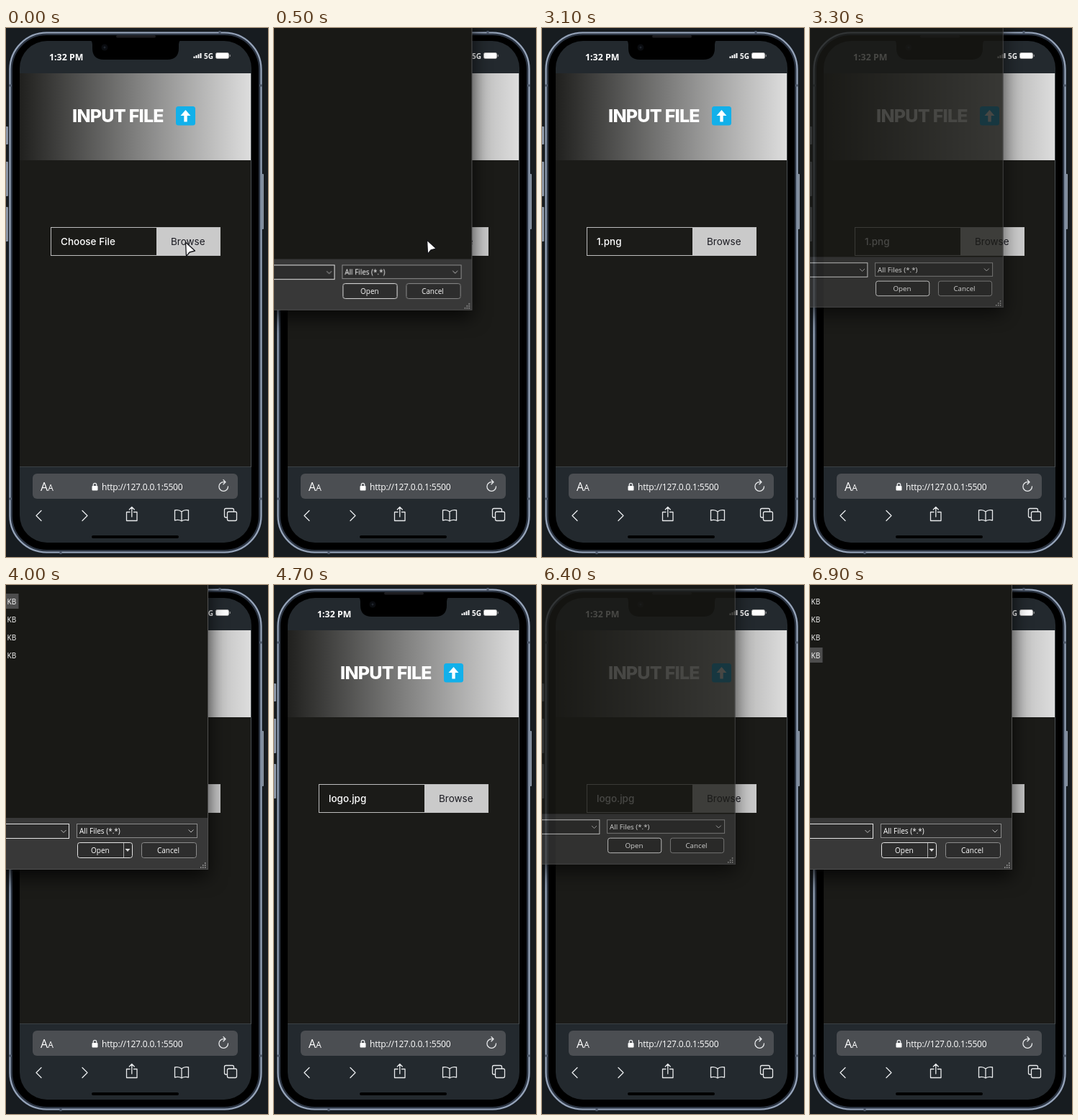
An HTML page that plays this animation: 364x736 px, repeating every 8000 ms.

```html
<!DOCTYPE html>
<html lang="en">
<head>
<meta charset="utf-8">
<title>Input file</title>
<style>
  html, body { margin: 0; width: 100%; height: 100%; overflow: hidden; background: #171c20; }
  svg { display: block; width: 364px; height: 736px; }
  text { font-family: "Open Sans", "Noto Sans", sans-serif; fill: #fff; }
  .page text { font: 500 13.5px Inter, sans-serif; }
  .page .title { font: 800 25px Inter, sans-serif; letter-spacing: -.75px; }
  .page .browse { font-weight: 400; fill: #1b1b22; }
  .status { font-weight: 700; font-size: 12.4px; }
  .line { fill: none; stroke: #e8eaec; stroke-width: 1.3; stroke-linecap: round; stroke-linejoin: round; }
  .dialog text { font-size: 10px; }
  .box { fill: #2d2d2d; stroke: #8c8c8c; }
  .lit { stroke: #e4e4e4; }
  .thin { fill: none; stroke: #bbb; }
  .panel { filter: drop-shadow(0 10px 13px rgba(0, 0, 0, .75)); }

  .dialog, .files, .pick, .cursor, .name {
    animation: 8s step-end -5ms infinite;
  }
  .dialog { transform-origin: -230px 95px; animation-name: dialog; }
  .files { animation-name: files; }
  .pick { animation-name: pick; }
  .cursor { animation-name: cursor; }
  .n1 { animation-name: n1; }
  .n2 { animation-name: n2; }
  .n3 { animation-name: n3; }

  @keyframes dialog {
    0%, 22.5%, 58.75% { opacity: 0; transform: scale(.94); }
    3.75%, 40%, 78.75% { opacity: .3; transform: scale(.955); }
    5%, 41.25%, 80% { opacity: .8; transform: scale(.976); }
    6.25%, 42.5%, 81.25% { opacity: 1; transform: scale(.989); }
    7.5%, 43.75%, 82.5% { opacity: 1; transform: scale(.997); }
    8.75%, 45%, 83.75%, 100% { opacity: 1; transform: none; }
    20%, 56.25% { opacity: .52; transform: scale(.975); }
    21.25%, 57.5% { opacity: .12; transform: scale(.96); }
  }
  @keyframes files {
    0%, 22.5%, 58.75% { visibility: hidden; }
    8.75%, 43.75%, 82.5%, 100% { visibility: visible; }
  }
  @keyframes pick {
    0%, 22.5%, 58.75% { opacity: 0; transform: none; stroke: none; }
    17.5% { opacity: 1; transform: translateY(25px); stroke: #8a8a8a; }
    50% { opacity: 1; transform: none; stroke: none; }
    86.25%, 100% { opacity: 1; transform: translateY(75px); stroke: none; }
  }
  @keyframes cursor {
    0% { transform: translate(249px, 298px); }
    2.5% { transform: translate(249px, 298px); animation-timing-function: steps(3); }
    6.25% { transform: translate(212px, 295px); animation-timing-function: steps(4); }
    11.25% { transform: translate(-24px, 170px); }
    22.5% { transform: translate(-24px, 150px); animation-timing-function: steps(6); }
    30%, 33.75% { transform: translate(255px, 299px); }
    35% { transform: translate(255px, 299px); animation-timing-function: steps(3); }
    38.75% { transform: translate(-24px, 160px); }
    58.75% { transform: translate(-24px, 130px); animation-timing-function: steps(6); }
    66.25% { transform: translate(261px, 295px); animation-timing-function: steps(2); }
    68.75% { transform: translate(265px, 298px); }
    71.25% { transform: translate(265px, 298px); animation-timing-function: steps(4); }
    76.25%, 100% { transform: translate(-24px, 190px); }
  }
  @keyframes n1 { 0% { opacity: 1; } 21.25%, 100% { opacity: 0; } }
  @keyframes n2 { 0%, 57.5%, 100% { opacity: 0; } 21.25% { opacity: 1; } }
  @keyframes n3 { 0% { opacity: 0; } 57.5%, 100% { opacity: 1; } }
</style>
</head>
<body>
<svg viewBox="0 0 364 736">
  <defs>
    <linearGradient id="banner">
      <stop offset="0" stop-color="#20201e"/>
      <stop offset="1" stop-color="#dedede"/>
    </linearGradient>
    <clipPath id="screen"><rect x="19" y="18" width="322" height="698" rx="38"/></clipPath>
  </defs>

  <!-- phone body -->
  <g fill="#8a95a5">
    <rect x="-2" y="137" width="5" height="25" rx="1"/>
    <rect x="-2" y="186" width="5" height="48" rx="1"/>
    <rect x="-2" y="249" width="5" height="48" rx="1"/>
    <rect x="355" y="203" width="3" height="77" rx="1"/>
  </g>
  <rect x="6.5" y="7.5" width="347" height="721" rx="50" stroke="#2c3543" stroke-width="5"/>
  <rect x="5.5" y="6.5" width="349" height="723" rx="51" fill="none" stroke="#97a5ba" stroke-width="2.2"/>
  <path d="M4 80h4M352 80h4M4 655h4M352 655h4M76 728v4M297 4v4" stroke="#4e596a" stroke-width="3"/>

  <g class="page" clip-path="url(#screen)">
    <rect x="19" y="18" width="322" height="698" fill="#23292e"/>
    <rect x="19" y="63" width="322" height="548" fill="#1b1b18"/>
    <rect x="19" y="63" width="322" height="121" fill="url(#banner)"/>
    <path d="M19 610.5h322" stroke="#3b4044"/>
    <path d="M340.5 63v548" stroke="#4a4f52"/>
    <text class="title" x="92" y="131">INPUT FILE</text>
    <rect x="236" y="109" width="27" height="26.5" rx="3.5" fill="#12b0ea"/>
    <path d="M249.5 114l7 8h-4.800v8.500h-4.400V122h-4.800z" fill="#fff"/>
    <rect x="62.5" y="277.5" width="235" height="39" fill="none" stroke="#bdbdbd"/>
    <rect x="209" y="278" width="88.500" height="38.500" fill="#cacaca"/>
    <text class="browse" x="229" y="301.5">Browse</text>
    <text class="name n1" x="76" y="301.5">Choose File</text>
    <text class="name n2" x="76" y="301.5">1.png</text>
    <text class="name n3" x="76" y="301.5">logo.jpg</text>
  </g>

  <!-- notch and status bar -->
  <path d="M115 16h130q-5 1-5 7v5q0 16-16 16h-88q-16 0-16-16v-5q0-6-5-7z"/>
  <rect x="153" y="10" width="55" height="3.5" rx="1.7" fill="#1d1d20"/>
  <circle cx="137" cy="27" r="4.500" fill="#0a0c10"/>
  <circle cx="137" cy="27" r="1.500" fill="#20262e"/>
  <text class="status" x="60" y="44.5">1:32 PM</text>
  <path d="M261.5 42v-2.500M264.5 42v-4M267.5 42v-5.500M270.5 42v-7" stroke="#fff" stroke-width="2"/>
  <text class="status" x="275" y="42.5" style="font-size:10px">5G</text>
  <rect x="291.5" y="34.5" width="18" height="8" rx="2" fill="#fff" stroke="#aaa"/>
  <path d="M311.2 37v3" stroke="#aaa"/>

  <!-- browser bar -->
  <rect x="37" y="620" width="285" height="35" rx="6" fill="#4b4e52"/>
  <text x="48" y="644" font-size="16">A<tspan font-size="12">A</tspan></text>
  <rect x="119.5" y="637" width="8" height="6.5" rx="1" fill="#fff"/>
  <path class="line" d="M121.3 637v-1.500a2.200 2.200 0 0 1 4.400 0v1.500"/>
  <text x="133" y="642.5" font-size="12" letter-spacing="-.2">http://127.0.0.1:5500</text>
  <g class="line">
    <path d="M308.500 638a6.300 6.300 0 1 1-6.300-6.300h2.300M302 628.700l3 3-3 3"/>
    <path d="M49 671.5l-7 7 7 7M106 671.5l7 7-7 7"/>
    <path d="M172 673.5h-4.500v12h14.500v-12h-4.500M174.800 680v-13M171.300 670l3.500-3.500 3.500 3.500"/>
    <path d="M244 673q-4-3.500-9.500-2v14q5.500-1.500 9.500 1 4-2.500 9.500-1v-14q-5.500-1.500-9.500 2zv13"/>
    <rect x="307.5" y="673" width="13" height="12.5" rx="2"/>
    <path d="M307 681h-1.500q-2 0-2-2v-8.500q0-2 2-2h9q2 0 2 2v2"/>
  </g>
  <rect x="119" y="706" width="121" height="4" rx="2"/>

  <g class="dialog">
    <rect class="panel" x="-740" y="-210" width="1021" height="606" fill="#191916"/>
    <path d="M-740 324H281v72H-740z" fill="#383838"/>
    <path d="M280.5-210v606M-740 395.5H281" stroke="#505050"/>
    <rect class="box lit" x="-400" y="332.5" width="487.5" height="20"/>
    <rect class="box" x="98.5" y="332.5" width="167" height="19"/>
    <path class="thin" d="M76.5 341l3.500 3.500 3.500-3.500M253.5 340.5l3.500 3.500 3.500-3.500"/>
    <text x="102" y="346">All Files (*.*)</text>
    <rect class="box lit" x="99.5" y="358.5" width="76" height="21" rx="3"/>
    <rect class="box" x="188.5" y="358.5" width="76" height="21" rx="3"/>
    <text x="210" y="373">Cancel</text>
    <path d="M270 393h9M273 390h6M276 387h3" stroke="#aaa" stroke-width="1.5" stroke-dasharray="1.5"/>
    <text x="124" y="373">Open</text>
    <g class="files">
      <rect x="101" y="360" width="73" height="18" fill="#2d2d2d"/>
      <text x="118" y="373">Open</text>
      <path d="M163.5 359v20" stroke="#aaa"/>
      <path d="M165.5 367h7l-3.500 4z" fill="#ddd"/>
      <rect class="pick" x="-600" y="12" width="617.5" height="21" fill="#4d4d4d"/>
      <text x="1.5" y="26.5">KB</text>
      <text x="1.5" y="51.5">KB</text>
      <text x="1.5" y="76.5">KB</text>
      <text x="1.5" y="101.5">KB</text>
    </g>
  </g>

  <path class="cursor" d="M.5 0L1.500 19.500 6 14 13.500 12z" fill="#fff" stroke="#16161a" stroke-width="1.300" stroke-linejoin="round"/>
</svg>
</body>
</html>
```
